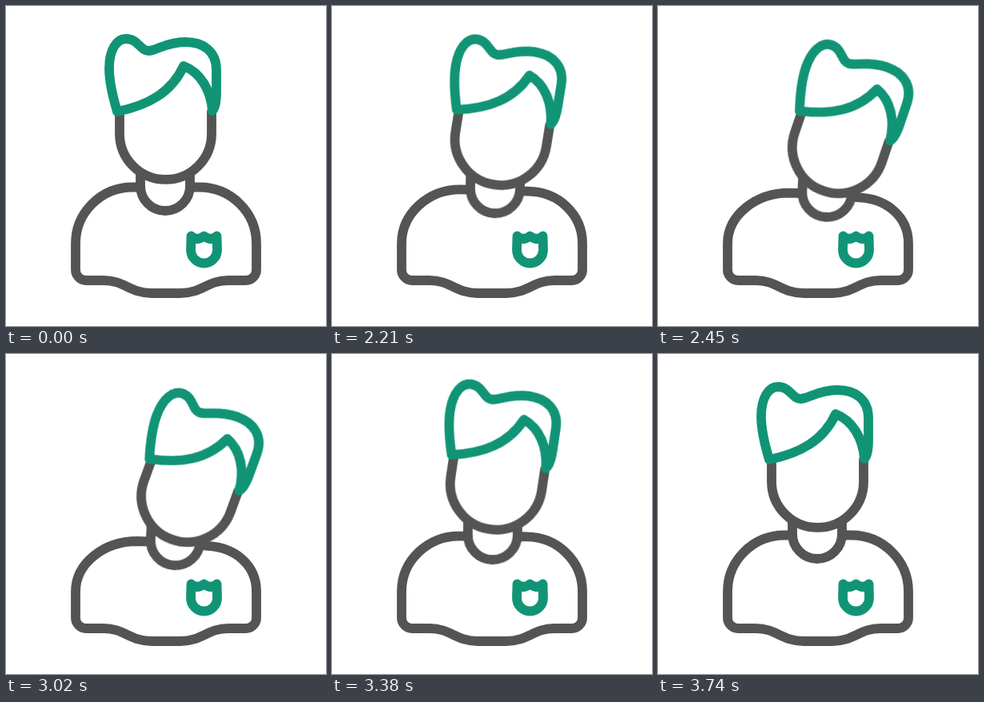
An HTML page that plays this animation: 400x400 px, repeating every 3770 ms.

```html
<!DOCTYPE html>
<html lang="en">
<head>
<meta charset="utf-8">
<title>Nodding head</title>
<style>
  html, body { margin: 0; width: 100%; height: 100%; overflow: hidden; background: #fff; }
  svg { display: block; width: 100vw; height: 100vh; }
  path { fill: none; stroke: #545454; stroke-width: 11.8; stroke-linecap: round; stroke-linejoin: round; }
  .green { stroke: #119476; }
  .face { fill: #fff; }

  .body, .collar, .shift, .tilt { animation: 3770ms linear infinite; }
  .body { animation-name: body; }
  .collar { animation-name: collar; transform-origin: 199px 225px; }
  .shift { animation-name: shift; }
  .tilt { animation-name: tilt; transform-origin: 187px 195px; }

  /* lean from 2030 ms, return from 3020 ms; each easing drives the move that leaves its pose */
  @keyframes body {
    0%, 53.85%, 99.2%, 100% {
      d: path("M168 226.5 L158 226.5 C119 226.5 87 258 87 297 L87 330 C87 337 93 343 100 343 L122 343 C148 343 155 359 182 359 L218 359 C245 359 252 343 278 343 L300 343 C307 343 313 337 313 330 L313 297 C313 258 281 226.5 242 226.5 L232 226.5");
      animation-timing-function: cubic-bezier(.35, 0, .4, 1);
    }
    67.64%, 80.11% {
      d: path("M180 234.5 L164 234 C122 234 87 262 87 297 L87 330 C87 337 93 343 100 343 L122 343 C148 343 155 359 182 359 L218 359 C245 359 252 343 278 343 L300 343 C307 343 313 337 313 330 L313 297 C313 264 287 242 252 240 L243 239");
      animation-timing-function: cubic-bezier(.25, .3, .2, 1);
    }
  }
  @keyframes collar {
    0%, 53.85%, 99.2%, 100% {
      transform: translate(0, 0) rotate(0deg);
      animation-timing-function: cubic-bezier(.35, 0, .4, 1);
    }
    67.64%, 80.11% {
      transform: translate(12.8px, 8.3px) rotate(3deg);
      animation-timing-function: cubic-bezier(.25, .3, .2, 1);
    }
  }
  @keyframes shift {
    0%, 53.85%, 93.63%, 100% {
      transform: translate(0, 0);
      animation-timing-function: cubic-bezier(.35, 0, .4, 1);
    }
    67.64%, 80.11% {
      transform: translate(15.8px, 11.8px);
      animation-timing-function: cubic-bezier(.2, .2, .2, 1);
    }
  }
  @keyframes tilt {
    0%, 53.85%, 99.2%, 100% {
      transform: rotate(0deg);
      animation-timing-function: cubic-bezier(.3, .15, .3, 1);
    }
    69.76%, 80.11% {
      transform: rotate(20deg);
      animation-timing-function: cubic-bezier(.33, 0, .55, 1);
    }
  }
</style>
</head>
<body>
<svg viewBox="0 0 400 400">
  <path class="body"/>
  <path class="green" d="M231.5 287.5 Q239 294.5 247.5 287.5 Q256 294.5 263.5 287.5 L264 305 A16.5 16.5 0 0 1 231 305 Z"/>
  <path class="collar" d="M168 207 V225 A31 31 0 0 0 230 225 V207"/>
  <g class="shift">
    <g class="tilt">
      <path class="face" d="M142 132 V159.5 A57.5 57.5 0 0 0 257 159.5 V132"/>
      <path class="green" d="M139 132 C133 112 129 95 129 78 C129 55 138 41 150 41 C165 41 168 56 178 56 C188 56 200 45 224 45 C247 45 263 57 263 80 V108 C263 120 261 128 258 131 C256 105 243 83 222 75 C207 108 178 124 139 132 Z"/>
    </g>
  </g>
</svg>
</body>
</html>
```
